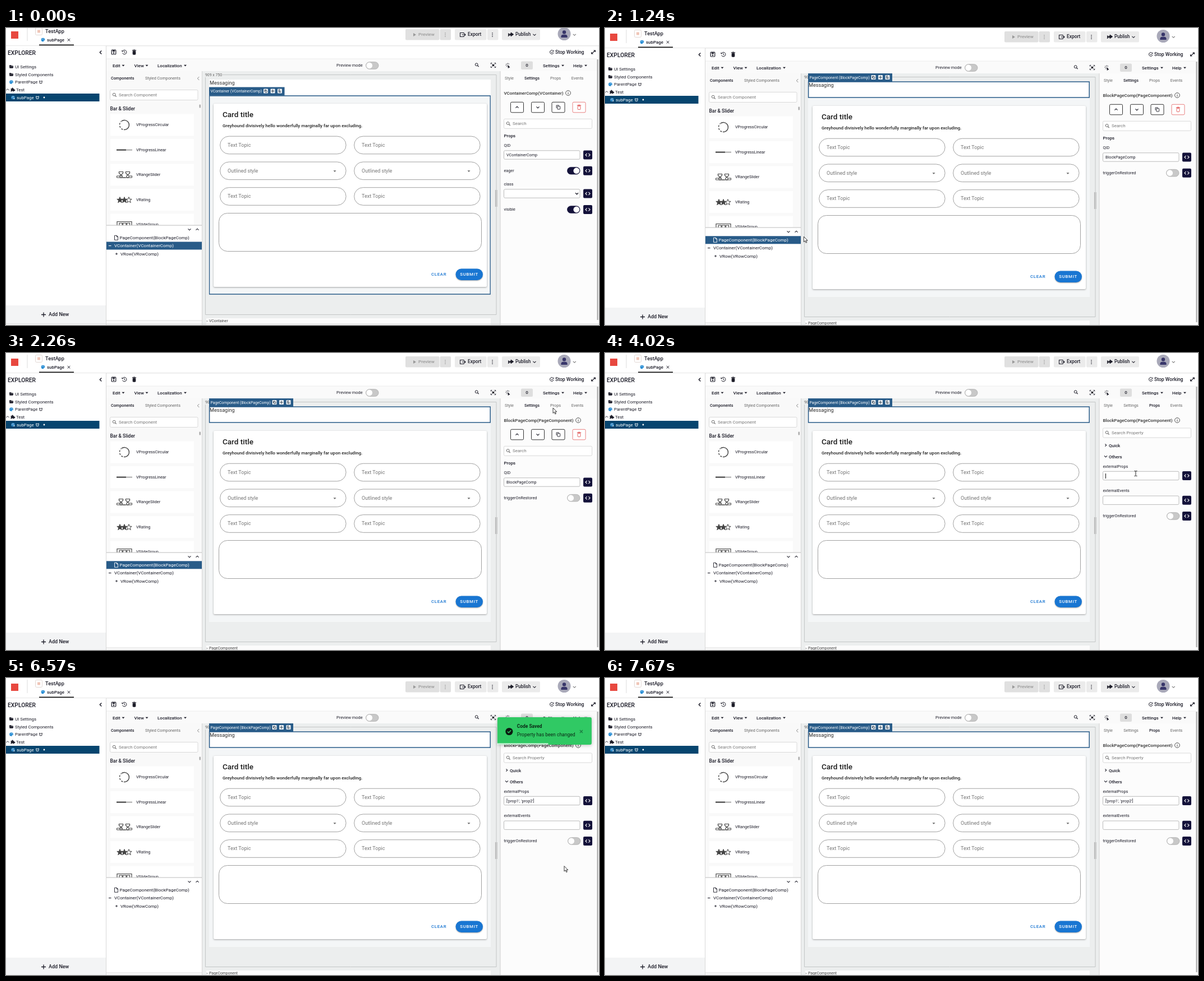
Write an HTML page with a canvas that moves like this. It is 1057 px wide and 530 px high and loops after 7800 ms.

```html
<!DOCTYPE html>
<html>
<head>
<meta charset="utf-8">
<title>Page builder</title>
<style>
html, body { margin: 0; width: 100%; height: 100%; overflow: hidden; background: #fff; }
canvas { display: block; }
</style>
</head>
<body>
<canvas id="stage" width="1057" height="530"></canvas>
<script>
const c = document.getElementById('stage').getContext('2d');
const LOOP = 7800, INK = '#1c1c28', GREY = '#666', BLUE = '#285b88', NAVY = '#14123a';

// Drawing helpers
function text(s, x, y, size = 7.25, color = INK, weight = 400, align = 'left') {
  c.font = `${weight} ${size}px Roboto, sans-serif`;
  c.fillStyle = color;
  c.textAlign = align;
  c.textBaseline = 'middle';
  c.fillText(s, x, y);
}
function rect(x, y, w, h, fill) {
  c.fillStyle = fill;
  c.fillRect(x, y, w, h);
}
function box(x, y, w, h, r, fill, stroke, lw = 1) {
  c.beginPath();
  c.roundRect(x, y, w, h, r);
  if (fill) { c.fillStyle = fill; c.fill(); }
  if (stroke) { c.strokeStyle = stroke; c.lineWidth = lw; c.stroke(); }
}
function disc(x, y, r, fill, stroke, lw = 1) {
  box(x - r, y - r, 2 * r, 2 * r, r, fill, stroke, lw);
}
// An SVG path placed at x, y
function shape(d, x, y, stroke, lw = 1, fill) {
  const p = new Path2D(d);
  c.save();
  c.translate(x, y);
  if (fill) { c.fillStyle = fill; c.fill(p); }
  if (stroke) { c.strokeStyle = stroke; c.lineWidth = lw; c.stroke(p); }
  c.restore();
}
function shadow(blur, y, color, draw) {
  c.save();
  c.shadowBlur = blur;
  c.shadowOffsetY = y;
  c.shadowColor = color;
  draw();
  c.restore();
}

// Icons
const CHEVRON = { down: 'M-2.5-1.2L0 1.3 2.5-1.2', up: 'M-2.5 1.2L0-1.3 2.5 1.2', left: 'M1.3-3L-1.7 0 1.3 3', right: 'M-1-2.2L1.2 0-1 2.2' };
const chevron = (dir, x, y, color = INK, lw = 1.1) => shape(CHEVRON[dir], x, y, color, lw);
const caretDown = (x, y, color = INK) => shape('M-2.5-1.2H2.5L0 1.4Z', x, y, null, 0, color);
const cross = (x, y, r, color, lw = 1) => shape(`M${-r} ${-r}L${r} ${r}M${r} ${-r}L${-r} ${r}`, x, y, color, lw);
const plus = (x, y, r, color, lw) => shape(`M${-r} 0H${r}M0 ${-r}V${r}`, x, y, color, lw);
const copy = (x, y, s, color) => {
  shape(`M${-s} ${s * .5}V${-s}H${s * .5}`, x, y, color, .9);
  box(x - s * .45, y - s * .5, s * 1.5, s * 1.7, .5, null, color, .9);
};
function magnifier(x, y, color = GREY) {
  disc(x - .8, y - .8, 2.4, null, color);
  shape('M1 1L3.2 3.2', x, y, color, 1.2);
}
function trash(x, y, color, solid) {
  box(x - 2.4, y - 2.2, 4.8, 6.2, .8, solid && color, color, .9);
  shape('M-3.6-3.4H3.6M-1.2-4.3H1.2', x, y, color, 1.1);
}
function palette(x, y, color) {
  disc(x, y, 3.3, color);
  for (const [dx, dy] of [[-1.6, -.3], [-.4, -1.7], [1.4, -1.1]]) disc(x + dx, y + dy, .55, '#fff');
  disc(x + 2, y + 2, 1, '#fff');
}
const folder = (x, y) => shape('M-3.5-2.8H-.5L.5-1.8H3.2V-.6H-2L-3.5 2.8ZM-2-.2H4L2.8 2.8H-3.2Z', x, y, null, 0, INK);
const pin = (x, y, color) => shape('M-2.5-2H-1L0-.8 1-2H2.5L1.7 2.3H-1.7Z', x, y, color, .9);
const dots = (x, y, color) => [-3, 0, 3].forEach(d => disc(x, y + d, .85, color));
const star = (x, y, fill) => shape('M0-5.4L1.4-1.7 5.2-1.6 2.2.8 3.3 4.6 0 2.4-3.3 4.6-2.2.8-5.2-1.6-1.4-1.7Z', x, y, '#444', 1, fill);

function toggle(x, y, on) {
  box(x, y - 6.3, 22.5, 12.6, 6.3, on ? NAVY : '#c8c8c8', on ? NAVY : '#aaa', .8);
  disc(x + (on ? 16.3 : 6.2), y, 5.4, '#fff');
}
function search(x, y, w, h, label) {
  box(x, y - h / 2, w, h, 2, '#fff', '#d9d9d9');
  magnifier(x + 8, y);
  text(label, x + 15.5, y + .3, 8, '#777');
}
function code(y) {
  box(1029, y - 8, 16, 16, 2, NAVY);
  shape('M-1.4-2.6L-4 0-1.4 2.6M1.4-2.6L4 0 1.4 2.6', 1037, y, '#fff', 1.1);
}
function input(y, value = '') {
  box(887.5, y - 7.7, 135.5, 15.4, 2, '#fff', '#bbb');
  text(value, 892, y + .5);
  code(y);
}

function header() {
  rect(0, 0, 1057, 36, '#fff');
  rect(9, 10, 13, 13, '#e8483f');
  rect(37.5, 3, 1, 24, '#ddd');
  box(52.5, 3.5, 12, 13, 2, '#fff', '#e2d8d4');
  rect(56, 7.5, 5, 5, '#f0c6b8');
  text('TestApp', 70, 10, 9.1, INK, 500);
  palette(66, 25, '#1e88d2');
  text('subPage', 73, 25.3, 7.9, INK, 500);
  cross(112, 25.3, 2.3, INK);
  rect(59, 33.5, 62, 2, '#111');
  rect(0, 35.3, 1057, 1, '#dcdcdc');
  for (const [x, w, grey] of [[712, 60.5, 1], [773.5, 19.5, 1], [800, 56.5], [858, 19.5], [884, 68]])
    box(x, 6, w, 19.5, 2, grey ? '#e0e0e0' : '#ebebeb');
  shape('M-2-3L3 0-2 3Z', 728, 16, null, 0, '#999');
  text('Preview', 735, 16, 8.1, '#999', 500);
  dots(783, 16, '#999');
  shape('M0-3.5H-4.5V3.5H2V1.8M2-1.8V-3.5H0M-1.5 0H5M3-2L5 0 3 2', 814, 16, INK, 1.1);
  text('Export', 823, 16, 8.4, INK, 500);
  dots(867, 16, INK);
  shape('M-5-2.6L-1.5 0-5 2.6M-4.8 3C-3.5.9-1.6.8 0 .9V2.8L4.8-.6 0-4V-1.8C-3-1.6-4.2 0-4.8 3Z', 900, 16, INK, .8, INK);
  text('Publish', 908, 16, 8.2, INK, 500);
  chevron('down', 942, 16);
  disc(995, 14.5, 11.5, '#a9a9b9');
  disc(995, 11.5, 3.2, '#38366a');
  shape('M-5.6 6.5V5C-5.6 1-2.5 1.2 0 1.2S5.6 1 5.6 5V6.5Z', 995, 14.5, null, 0, '#38366a');
  chevron('down', 1013.3, 16, '#777');
}

function explorer() {
  rect(0, 36, 178, 500, '#fff');
  text('EXPLORER', 3, 49, 10.3, INK, 500);
  chevron('left', 169, 47.5, INK, 1.4);
  rect(0, 121, 166.5, 14, '#07456f');
  [73, 87].forEach(y => folder(9.5, y));
  text('UI Settings', 16, 73.3, 7.9);
  text('Styled Components', 16, 87.3, 7.9);
  palette(9.5, 100.5, '#1e88d2');
  text('ParentPage', 16, 101, 7.8);
  pin(62, 100.5, INK);
  chevron('up', 3, 114, INK, .9);
  shape('M-3-1.5H-1A1.2 1.2 0 1 1 1-1.5H3V.2A1.2 1.2 0 1 1 3 2.2V3.5H1A1 1 0 0 0-1 3.5H-3V1.8A1 1 0 0 0-3 0Z', 11.5, 113.8, null, 0, INK);
  text('Test', 18, 114.5, 7.9);
  palette(12.5, 128, '#2f86c4');
  text('subPage', 19, 128.3, 7.9, '#fff');
  pin(56, 128, '#fff');
  disc(68, 128, 1.4, '#fff');
  rect(0, 499, 178, 33, '#f3f4f5');
  plus(67, 515.5, 4, INK, 1.3);
  text('Add New', 76, 515.8, 9, INK, 500);
  rect(178, 36, 1, 500, '#d8d8d8');
}

function toolbar() {
  rect(179, 36.3, 878, 45, '#fff');
  rect(179, 59, 874, 22, '#fafafa');
  rect(179, 58.5, 874, 1, '#eee');
  box(188.2, 43.2, 7.6, 7.8, 1, null, INK, 1.2);
  rect(190, 44, 4, 2.2, INK);
  disc(192, 48.5, 1.2, INK);
  shape('M-3.2-1.8A3.8 3.8 0 1 1-3.4 1.6M-4.2-3.2V-1.2H-2M0-2V.3L1.6 1.2', 211, 47, INK, 1);
  trash(228.5, 47.3, INK, true);
  shape('M2.8-1.8A3.4 3.4 0 1 0 3.2.8M-1.6-.4L0 1.2 3.8-2.8', 973, 47, INK, 1);
  text('Stop Working', 979, 47.3, 8.6, INK, 500);
  shape('M-3.4 0V3H-.4M-3.4 3L3.4-3M3.4 0V-3H.4', 1047, 47, INK, 1.1);
  for (const [s, x, a] of [['Edit', 190, 209], ['View', 228.5, 251], ['Localization', 270, 319.5], ['Settings', 957, 992.5], ['Help', 1011, 1033.5]]) {
    text(s, x, 71.2, 8, INK, 500);
    caretDown(a, 71);
  }
  text('Preview mode', 589, 71.2, 7.45);
  toggle(641.5, 71, false);
  magnifier(839.5, 70, INK);
  shape('M-4.2-2V-4H-2.2M2.2-4H4.2V-2M4.2 2V4H2.2M-2.2 4H-4.2V2M-2.6-2.4L2.6 2.4M2.6-2.4L-2.6 2.4', 868.5, 70.5, INK, 1);
  disc(868.5, 70.5, 1.7, INK);
  shape('M0 0L3.4 3.6H1.4L.8 5ZM-4-.4H-2M0-4V-2M-2.8-3.2L-1.5-1.8M2.6-3L1.4-1.8M-2.8 2.6L-1.5 1.4', 894.5, 70.5, INK, .9, INK);
  box(918, 63.5, 21, 14.5, 2, '#dedede');
  text('0', 928.5, 71, 8, INK, 500, 'center');
}

function palettePanel() {
  rect(179, 81, 170, 455, '#f9f9f9');
  text('Components', 187, 94.3, 7.25, INK, 500);
  text('Styled Components', 248, 94.3, 7.25, GREY);
  chevron('left', 343, 94, '#888', 1);
  search(185.5, 123.5, 156.5, 18, 'Search Component');
  text('Bar & Slider', 185.5, 148.5, 8.5, INK, 500);
  box(344.5, 140.5, 2.5, 6, 1, '#aaa');
  const names = ['VProgressCircular', 'VProgressLinear', 'VRangeSlider', 'VRating', 'VSlideGroup'];
  names.forEach((s, i) => {
    const y = 177 + 44.5 * i;
    rect(186, y - 19.5, 149, 39, '#fff');
    text(s, 232, y + .3, 7.25);
  });
  c.beginPath();
  c.arc(211, 177, 8.5, -2.2, 1.7);
  c.strokeStyle = '#444'; c.lineWidth = 1.4; c.stroke();
  c.setLineDash([3, 2.5]);
  c.beginPath(); c.arc(211, 177, 8.5, 1.9, 4); c.stroke();
  c.setLineDash([]);
  rect(197, 220.6, 28, 2, '#aaa');
  rect(197, 220.6, 17, 2, '#444');
  for (const x of [205, 217]) {
    shape('M-3.5-4.5H3.5V-2L0 1.5-3.5-2Z', x, 265, '#444', 1.2);
    disc(x, 269, 2.2, '#fff', '#444', 1.1);
  }
  shape('M-7 0H-2.5M9.5 0H14.5M-7 0H-13V3H14V0M-3 3H3', 210.5, 268, '#444', 1);
  star(203, 311, '#444'); star(211, 311, '#444'); star(219, 311, '#fff');
  shape('M-13-5H13V5H-13ZM-9-2.5H-4V5M-9-2.5V5M-2.5-2.5H3V5M-2.5-2.5V5M4.5-2.5H9.5V5M4.5-2.5V5', 211, 354.5, '#444', 1.2);
}

function tree(selected) {
  rect(179, 356, 170, 170, '#fff');
  rect(179, 355.5, 170, 1.2, '#c8c8c8');
  rect(179, 525.5, 170, 1, '#ddd');
  chevron('down', 327, 363.5);
  chevron('up', 341, 363.5);
  const row = [371.3, 385.5][selected];
  if (row) rect(179, row, 170, 14, BLUE);
  const ink = i => i === selected ? '#fff' : INK;
  shape('M-3-4H1L3-2V4H-3ZM.8-4V-1.8H3', 196.5, 378.3, ink(0), .9);
  text('PageComponent(BlockPageComp)', 202.5, 378.5, 8, ink(0));
  rect(183, 392, 4.5, 1.1, ink(1));
  text('VContainer(VContainerComp)', 193, 392.8, 8, ink(1));
  plus(197, 407, 2, INK, .9);
  text('VRow(VRowComp)', 204, 407.2, 8);
}

// Coloured label with three small tool buttons
function tag(s, x, y, w, h, fill, ink) {
  rect(x, y, w, h, fill);
  text(s, x + 2.5, y + h / 2 + .2, 6.8, ink);
  [-33.5, -21, -8.5].forEach((d, i) => {
    const bx = x + w + d, by = y + h / 2 - .5;
    box(bx - 4, by - 4, 8, 8, 1, '#eef2f6');
    if (i === 0) copy(bx, by, 2, '#345');
    if (i === 1) plus(bx, by, 2.8, '#345', 1);
    if (i === 2) shape('M-2-2.5H.5M-1.5-2.5V2H2M-1.5 0H2', bx, by, '#345', 1);
  });
}
function outline(y, h) {
  c.strokeStyle = '#6b90b3';
  c.lineWidth = 1;
  c.setLineDash([2, 1.5]);
  c.strokeRect(363, y + .5, 499.5, h);
  c.setLineDash([]);
}

function canvasArea(t, selectPage) {
  rect(349, 81, 532, 455, '#eceeee');
  rect(349, 81, 1, 455, '#d5d5d5');
  box(355.5, 87.5, 518.5, 428, 0, null, '#c3c6c6');
  rect(355, 84, 31, 8, '#eceeee');
  text('909 x 750', 355, 88, 6.9, GREY);
  rect(362, 96, 502, 28, '#fff');
  rect(362, 124, 502, 356, '#f4f6f7');
  text('Messaging', 363, 102.8, 9.1, '#333');
  shadow(3, 1, 'rgba(0,0,0,.35)', () => box(370, 139, 487, 327, 2, '#fff'));
  text('Card title', 386, 159, 13.5, '#1d1d1d', 500);
  text('Greyhound divisively hello wonderfully marginally far upon excluding.', 386, 178.3, 8.08, '#222', 500);
  for (const x of [382, 621]) {
    [213, 258.8, 304.5].forEach((y, i) => {
      box(x - .4, y - 15.8, 224.5, 31.6, 15.8, '#fff', '#a0a0a0');
      text(i === 1 ? 'Outlined style' : 'Text Topic', x + 13, y + .2, 9, '#757575');
    });
    caretDown(x + 204, 259.5, '#666');
  }
  box(379.5, 334.5, 468, 68, 15, '#fff', '#a0a0a0');
  c.letterSpacing = '.7px';
  text('CLEAR', 758, 443.7, 7.8, '#1976d2', 500);
  shadow(2, 1, 'rgba(0,0,0,.35)', () => box(801.5, 433.5, 48.5, 20.5, 10.2, '#1976d2'));
  text('SUBMIT', 809.3, 443.7, 7.8, '#fff', 500);
  c.letterSpacing = '0px';
  rect(872, 293, 1, 30, '#aaa');
  rect(874.5, 293, 1, 30, '#aaa');
  rect(357, 522, 507, 14, '#fbfbfb');
  text('>', 357, 527, 5.5, GREY);
  text(selectPage ? 'PageComponent' : 'VContainer', 362, 527, 6.85, '#444');

  if (!selectPage) {
    box(362.6, 125, 500.6, 354, 0, null, BLUE, 1.3);
    tag('VContainer (VContainerComp)', 362, 109.5, 134.5, 15, BLUE, '#fff');
  } else if (t < 6030 || t >= 6100) {
    box(362.6, 96, 500.6, 28, 0, null, BLUE, 1.5);
    tag('PageComponent (BlockPageComp)', 362, 81, 150, 15, BLUE, '#fff');
  }
  const over = 'rgba(121,147,174,.96)';
  if (t > 210 && t < 1170) {
    outline(130.5, 341);
    tag('VCol (VColComp)', 363, 116.5, 95, 14, over, '#1d2b3a');
  }
  if ((t > 420 && t < 1170) || (t > 1400 && t < 1760)) {
    outline(326, 100);
    tag('VCol (EdtrComp_217)', 363, 312.5, 107.5, 14, over, '#1d2b3a');
  }
}

function sidePanel(t, selectPage) {
  const props = t >= 2600;
  rect(881, 81, 172, 455, '#fcfcfc');
  rect(880.5, 81, 1, 455, '#d0d0d0');
  [['Style', 897], ['Settings', 937.5], ['Props', 979.5], ['Events', 1018.5]].forEach(([s, x], i) => {
    const on = i === (props ? 2 : 1);
    text(s, x, 94.3, 7.3, on ? INK : GREY, on ? 500 : 400, 'center');
  });
  const title = selectPage ? 'BlockPageComp(PageComponent)' : 'VContainerComp(VContainer)';
  text(title, 887.5, 120.3, 7.95, '#333', 500);
  const ix = selectPage ? 1020 : 1002;
  disc(ix, 120, 4.4, null, '#444', .9);
  shape('M0-.6V2.4M0-2.4V-1.5', ix, 120, '#444', 1);

  if (props) return propsTab(t);
  [911, 948, 984.5, 1021.5].forEach((x, i) =>
    box(x - 11.5, 136.3, 23, 18.5, 2, '#fff', i === 3 ? '#e88080' : '#333', 1));
  chevron('up', 911, 145.5, INK, 1.2);
  chevron('down', 948, 145.5, INK, 1.2);
  copy(984.3, 145.2, 3.2, INK);
  trash(1021.5, 145.5, '#e05555');
  search(887.5, 174.8, 157, 17, 'Search');
  text('Props', 887.5, 197, 7.9, INK, 500);
  text('QID', 887.5, 214.2, 7.25);
  input(230.5, selectPage ? 'BlockPageComp' : 'VContainerComp');
  text(selectPage ? 'triggerOnRestored' : 'eager', 887.5, 258.7, 7.25);
  toggle(1000.5, 258.7, !selectPage);
  code(258.7);
  if (!selectPage) {
    text('class', 887.5, 282.5, 7.25);
    input(299.5);
    chevron('down', 1017.5, 299.5, INK, 1.3);
    text('visible', 887.5, 328, 7.25);
    toggle(1000.5, 328, true);
    code(328);
  }
}

function propsTab(t) {
  const open = t >= 3620;
  search(887.5, 142.5, 157, 17, 'Search Property');
  chevron('right', 892.5, 164.5);
  text('Quick', 898, 165.2, 7.95, INK, 500);
  chevron(open ? 'down' : 'right', 892.5, 184.5);
  text('Others', 898, 185.2, 7.95, INK, 500);
  if (!open) return;
  text('externalProps', 887.5, 202.8, 7.25);
  input(219, t >= 4750 ? "['prop1', 'prop2']" : '');
  text('externalEvents', 887.5, 246.2, 7.25);
  input(262.7);
  text('triggerOnRestored', 887.5, 291.2, 7.25);
  toggle(1001.5, 291, false);
  code(291);
  if (t >= 4020 && t < 4550) rect(892, 215, 1, 9, '#111');
  if ((t >= 4750 && t < 5280) || (t >= 5840 && t < 6030)) rect(942, 215, 1, 9, '#111');
}

// Piecewise motion through [time, value, ...] keys
function along(keys, t, ease = p => p) {
  const i = keys.findIndex(k => k[0] > t);
  if (i < 0) return keys[keys.length - 1].slice(1);
  if (i === 0) return keys[0].slice(1);
  const a = keys[i - 1], b = keys[i], p = ease((t - a[0]) / (b[0] - a[0]));
  return a.slice(1).map((v, n) => v + (b[n + 1] - v) * p);
}
const easeOut = p => 1 - (1 - p) ** 3;
const easeIn = p => p * p;

function toast(t) {
  if (t < 6210 || t > 7720) return;
  const dx = t < 7150
    ? along([[6210, 1650], [6660, -14], [6772, 5.5], [6885, -2.7], [6960, 0]], t, easeOut)[0]
    : along([[7150, 0], [7450, -11], [7720, 300]], t, easeIn)[0];
  const x = 877 + dx;
  c.save();
  c.globalAlpha = t > 7450 ? 1 - (t - 7450) / 450 : 1;
  shadow(6, 1, 'rgba(0,0,0,.25)', () => box(x, 70, 168, 49, 3, '#30c964'));
  disc(x + 21, 95.5, 6.6, '#0b1a10');
  shape('M-3 0L-.8 2.2 3.2-2.2', x + 21, 95.5, '#30c964', 1.5);
  text('Code Saved', x + 35, 87, 8.4, '#0b2a16', 700);
  text('Property has been changed', x + 35, 101.3, 8.55, '#0b2a16');
  cross(x + 149.5, 95.5, 2.5, '#1c7a40', 1.2);
  const left = Math.max(0, 1 - (t - 6110) / 1000);
  rect(x, 116.3, 168 * left, 2.7, 'rgba(255,255,255,.7)');
  c.restore();
}

const PATH = [
  [70, 917, 495], [210, 800, 468], [350, 650, 440], [490, 510, 408], [630, 345, 386], [710, 319, 381],
  [910, 313, 375], [1170, 313, 375], [1510, 511, 362], [1920, 937, 173], [2260, 975, 98], [2460, 975, 96],
  [2700, 975, 96], [3210, 914, 163], [3410, 914, 163], [3550, 912, 183], [3640, 912, 183], [3880, 946, 215],
  [5080, 946, 215], [5440, 970, 241], [6290, 970, 241], [6570, 995, 335], [6900, 985, 535]
];
function pointer(t) {
  if (t < 70 || t > 6900) return;
  const [x, y] = along(PATH, t);
  if (t > 3800 && t < 5220)
    shape('M-2.5-4.5H-.7L0-3.8 .7-4.5H2.5M0-3.8V3.8M-2.5 4.5H-.7L0 3.8 .7 4.5H2.5', x, y, '#222', 1);
  else
    shape('M0 0V9.4L2.2 7.4 3.8 11 5.4 10.3 3.8 6.9H6.8Z', x, y, '#222', .9, '#fff');
}

function draw(t) {
  const selectPage = t >= 1170;
  c.clearRect(0, 0, 1057, 530);
  rect(0, 0, 1057, 530, '#fff');
  c.save();
  c.translate(0, selectPage ? 0 : -4);
  toolbar();
  header();
  explorer();
  palettePanel();
  tree(!selectPage ? 1 : t < 2600 ? 0 : -1);
  canvasArea(t, selectPage);
  sidePanel(t, selectPage);
  rect(1053, 36.5, 4, 500, '#fafafa');
  rect(1053.5, 60, 2, 465, '#a5a5a5');
  rect(0, 531.5, 1057, 1, '#d5d5d5');
  c.restore();
  toast(t);
  pointer(t);
}

const start = performance.now();
(function frame() {
  draw((performance.now() - start) % LOOP);
  requestAnimationFrame(frame);
})();
</script>
</body>
</html>
```
